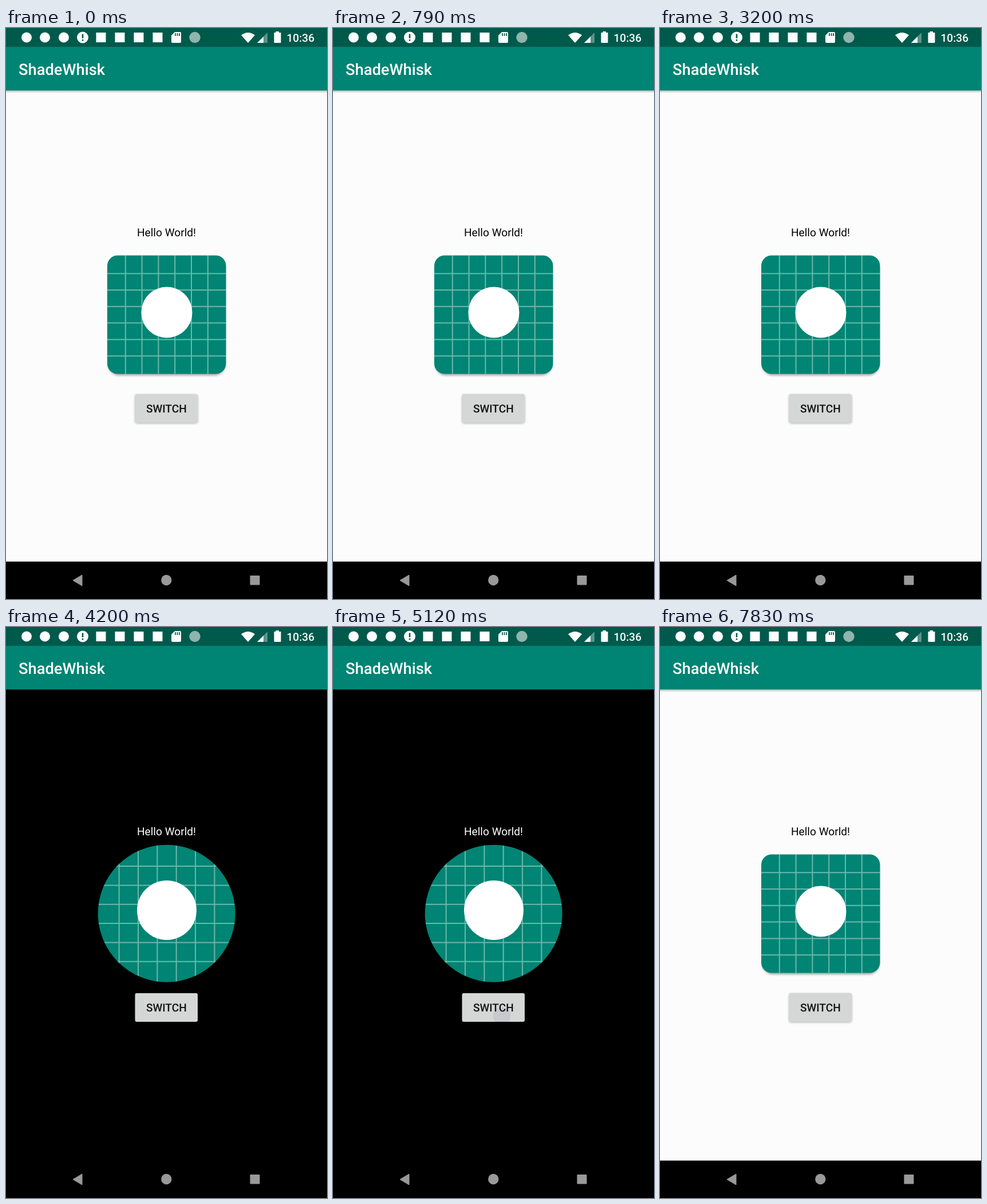
An HTML page for the animation above (7870 ms loop, 561 px wide and 998 px high).

```html
<!DOCTYPE html>
<html lang="en">
<head>
<meta charset="utf-8">
<title>Theme switch</title>
<style>
  html, body { margin: 0; width: 100%; height: 100%; overflow: hidden; background: #000; }
  svg { display: block; width: 100vw; height: 100vh; }
  text { font-family: Roboto, sans-serif; text-rendering: geometricPrecision; }
  .medium { font-weight: 500; }
</style>
</head>
<body>
<svg viewBox="0 0 561 998">
  <defs>
    <filter id="soft" x="-20%" y="-40%" width="140%" height="180%"><feGaussianBlur stdDeviation="2"/></filter>
    <linearGradient id="barShade" x2="0" y2="1">
      <stop stop-color="#000" stop-opacity=".26"/>
      <stop offset="1" stop-color="#000" stop-opacity="0"/>
    </linearGradient>
    <clipPath id="tileClip"><rect x="177" y="397.5" width="207.5" height="207" rx="18"/></clipPath>
    <clipPath id="discClip"><circle cx="280.7" cy="500.7" r="120"/></clipPath>
    <clipPath id="buttonClip"><rect x="225.5" y="640" width="109.5" height="50" rx="3"/></clipPath>
  </defs>

  <rect id="page" y="100" width="561" height="833"/>
  <rect id="barShadow" y="109" width="561" height="5" fill="url(#barShade)"/>
  <rect width="561" height="109.2" fill="#008473"/>
  <rect width="561" height="33" fill="#005a4c"/>
  <text class="medium" x="22" y="81.5" font-size="27.3" fill="#fff">ShadeWhisk</text>

  <g id="status" fill="#fff">
    <circle cx="134" cy="16.5" r="10"/>
    <path d="M132.7 10.5h2.6v7.5h-2.6zM132.7 20h2.6v2.6h-2.6z" fill="#005a4c"/>
    <path d="M295 7h9q2 0 2 2v15q0 2-2 2h-13q-2 0-2-2v-11z"/>
    <path d="M296 9v5M299.5 9v5M303 9v5" stroke="#005a4c" stroke-width="1.7"/>
    <circle cx="330" cy="16.5" r="9.7" fill="#8fb5ac"/>
    <path d="M411 12.5q12-9 24 0L423 26z"/>
    <path d="M457 8v18h-18z" opacity=".35"/>
    <path d="M450 15v11h-11z"/>
    <path d="M471.5 6h5.5v2h3q.5 0 .5 1v16q0 1-1 1h-10q-1 0-1-1v-16q0-1 .5-1h2.5z"/>
    <text class="medium" x="539" y="23.7" text-anchor="end" font-size="19.1">10:36</text>
  </g>

  <text id="hello" x="280.5" y="364.2" text-anchor="middle" font-size="19.1">Hello World!</text>

  <g id="tile">
    <rect x="179" y="403" width="203.5" height="204" rx="18" fill="#000" opacity=".38" filter="url(#soft)"/>
    <g clip-path="url(#tileClip)">
      <rect x="177" y="397" width="208" height="208" fill="#008473"/>
      <path id="tileGrid"/>
    </g>
    <circle cx="281" cy="497" r="44.5" fill="#fff"/>
  </g>
  <g id="disc">
    <g clip-path="url(#discClip)">
      <rect x="160" y="380" width="242" height="242" fill="#008473"/>
      <path id="discGrid"/>
    </g>
    <circle cx="281" cy="495" r="52" fill="#fff"/>
  </g>

  <rect id="buttonShadow" x="226" width="108.5" height="49" rx="3" fill="#000" filter="url(#soft)"/>
  <rect id="button" x="225.5" y="640" width="109.5" height="50" rx="3"/>
  <g clip-path="url(#buttonClip)"><circle id="ripple" cx="295" cy="680" fill="#aaaabd"/></g>
  <text class="medium" x="280.3" y="672" text-anchor="middle" font-size="19.1" fill="#111">SWITCH</text>

  <rect y="932.6" width="561" height="66"/>
  <g fill="#999">
    <path d="M133 956v19l-16-9.5z" stroke="#999" stroke-linejoin="round"/>
    <circle cx="280.3" cy="965" r="9.2"/>
    <rect x="426.5" y="957" width="17" height="16.5" rx="1"/>
  </g>
</svg>

<script>
const LOOP = 7870;
const TAPS = [3650, 4370, 5070, 5800]; // each tap flips the theme
const $ = id => document.getElementById(id);
const clamp = v => Math.max(0, Math.min(1, v));
const setAttrs = (node, attrs) => {
  for (const name in attrs) node.setAttribute(name, attrs[name]);
};
const set = (id, attrs) => setAttrs($(id), attrs);

// Six inner lines each way, running past the clipped edge.
function grid(id, x, y, step) {
  let d = '';
  for (let i = 1; i < 7; i++) {
    d += `M${x + i * step} ${y - step}v${step * 9}M${x - step} ${y + i * step}h${step * 9}`;
  }
  set(id, { d, fill: 'none', stroke: '#fff', 'stroke-opacity': .42, 'stroke-width': 2 });
}

function notification(x, round) {
  const shape = document.createElementNS('http://www.w3.org/2000/svg', round ? 'circle' : 'rect');
  setAttrs(shape, round
    ? { cx: x, cy: 16.5, r: 9 }
    : { x: x - 8.5, y: 8, width: 17, height: 17 });
  $('status').append(shape);
}

function render(t) {
  const done = TAPS.filter(tap => tap <= t);
  const dark = done.length % 2 === 1;
  const age = done.length ? t - done[done.length - 1] : Infinity;
  const lift = clamp(age / 100) * clamp((350 - age) / 100);
  const spread = clamp(age / 220);

  set('page', { fill: dark ? '#000' : '#fcfcfc' });
  set('barShadow', { opacity: dark ? 0 : 1 });
  set('hello', { fill: dark ? '#fff' : '#000' });
  set('tile', { visibility: dark ? 'hidden' : 'visible' });
  set('disc', { visibility: dark ? 'visible' : 'hidden' });
  set('buttonShadow', { y: 641.5 + 3 * lift, opacity: dark ? 0 : .38 + .05 * lift });
  set('button', { fill: lift > .5 && !dark ? '#d2d2d3' : '#d5d6d6' });
  set('ripple', { r: 6 + 40 * spread, opacity: .4 * (1 - spread) });
}

[36, 68, 101].forEach(x => notification(x, true));
[166, 199, 232, 265].forEach(x => notification(x, false));
grid('tileGrid', 180, 400.4, 28.8);
grid('discGrid', 164.3, 384.7, 33.35);

const start = performance.now();
function tick() {
  render((performance.now() - start) % LOOP);
  requestAnimationFrame(tick);
}
tick();
</script>
</body>
</html>
```
